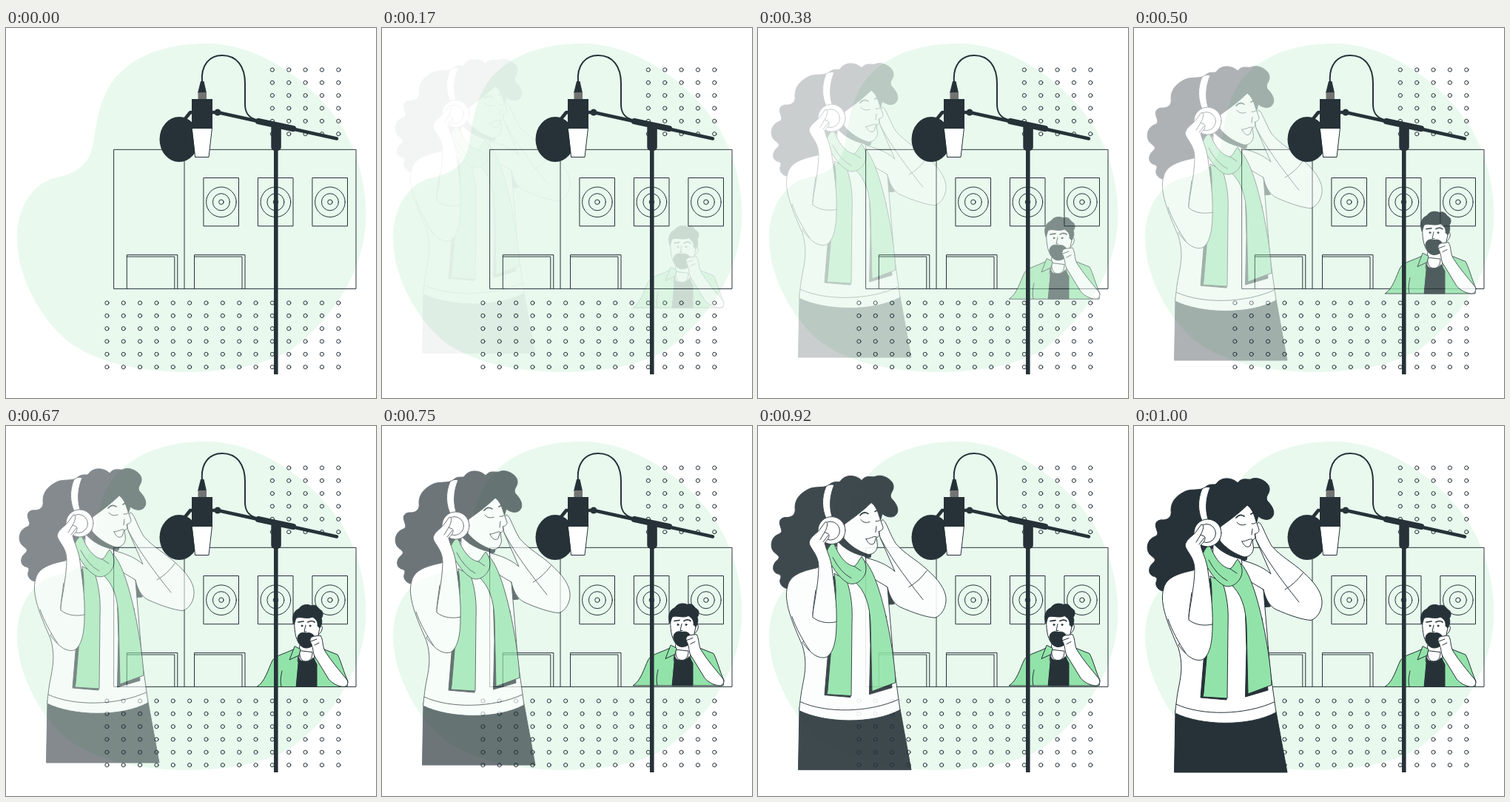
These frames come from a looping animation (500x500 px, 1040 ms). An HTML page:

```html
<!DOCTYPE html>
<html lang="en">
<head>
<meta charset="utf-8">
<title>Recording studio</title>
<style>
  html, body { margin: 0; width: 100%; height: 100%; overflow: hidden; background: #fff; }
  svg { display: block; width: 100vw; height: 100vh; }
  .line { fill: none; stroke: #263238; stroke-width: 1; stroke-linecap: round; stroke-linejoin: round; }
  .white { fill: #fff; }
  .green { fill: #92e3a9; }
  .dark { fill: #263238; }
  .rod { fill: none; stroke: #263238; stroke-linecap: round; stroke-linejoin: round; }
</style>
</head>
<body>
<svg viewBox="0 0 500 500">
  <path fill="#e9f9ee" d="M270 21C345 21 415 75 452 130C480 175 488 225 486 262C483 330 440 395 385 435C340 460 290 465 240 465C180 464 120 452 82 422C45 390 15 335 15 283C15 240 38 210 65 203C90 197 112 190 118 155C124 115 130 80 160 55C190 30 230 21 270 21Z"/>
  <g id="dots" class="line"></g>
  <g id="room" class="line">
    <path d="M146 164.3H473V352.4H146ZM241 164.3V352.4"/>
  </g>

  <g id="man" class="line">
    <path class="green" d="M388 302C376 308 364 310 360 317C354 329 350 346 339 352.4H461L462 345C456 332 453 318 448 309L428 301L410 310Z"/>
    <path class="white" d="M397 296L394 318L405 328L417 318L416 294Z"/>
    <path class="dark" d="M396 314C398 320 411 320 415 313L420 322V352.4H392.5Z"/>
    <path class="white" d="M397 304C396 310 398 318 405 318C412 318 414 312 414 306Z"/>
    <path class="green" d="M390 298L383 316L396 310L398 302Z"/>
    <path d="M372 352C370 344 372 336 373 331M396 310L392.5 352"/>
    <path class="white" d="M423 270C429 266 429 278 422 282Z"/>
    <path class="white" d="M390 260C389 274 391 287 396 294C404 302 416 297 421 287L425 268C424 258 416 252 408 252Z"/>
    <path class="dark" d="M389 268C386 259 388 250 396 247C400 240 409 241 413 243C419 240 422 246 424 248C429 250 429 256 426 260C428 265 426 270 424 273L421 270C422 264 418 260 414 258C406 262 396 256 392 260Z"/>
    <path class="dark" d="M394 287C394 280 400 278 406 280C412 278 418 283 418 289C417 297 411 300 405 300C398 299 395 294 394 287Z"/>
    <path class="white" d="M411 291C410 286 414 284 418 284L425 283C429 290 427 296 431 304C439 317 451 331 460 342C464 347 461 352.4 456 352.4C448 352 440 347 436 342L417 311C414 305 416 300 411 291Z"/>
    <path d="M412 291L420 288M417 296L423 293"/>
    <path stroke-width="1.7" d="M395 265L402 264M408 265Q413 262 417 265"/>
    <path d="M405 269L403 278L406 278"/>
    <circle class="dark" cx="400" cy="270" r="1"/>
    <circle class="dark" cx="411" cy="270" r="1"/>
  </g>

  <g id="woman" class="line">
    <path class="dark" d="M95 84C103 75 110 82 112 77C120 67 135 71 140 77C146 69 153 73 158 72C167 67 184 76 183 86C183 92 177 95 180 101C185 106 191 114 188 121C184 129 174 127 168 122L150 182C128 184 112 175 106 165L80 198L44 222C36 226 28 217 30 211C32 206 31 204 26 203C17 199 21 188 26 185C32 179 25 178 21 173C15 165 19 153 27 150C35 147 31 143 30 138C27 130 33 126 40 127C49 126 51 120 50 114C50 102 57 95 66 90C75 84 85 88 95 84Z"/>
    <path class="dark" d="M175 221L171 245L184 244Z"/>
    <path class="dark" d="M56 384L54.5 468H207L192 386Z"/>
    <path class="white" d="M80 195C56 200 43 206 40 220C34 240 46 268 60 300C66 320 64 335 61 350C58 364 57 375 55.5 388C90 405 155 407 192 387L184 330L175 222L148 182L105 176Z"/>
    <path d="M57 376C92 392 150 391 189.500 373"/>
    <path class="white" d="M140 180C158 184 174 190 185 200L165 154C163 146 163 135 168 130C173 131 176 145 186 162C199 177 214 184 228 197C244 211 253 224 254 236C255 248 248 260 239 262.500C228 262 210 256 192 248C182 243 177 231 175 221L148 205Z"/>
    <path d="M165 154C177 177 194 202 223 238M204 221Q218 213 228 199"/>
    <path class="white" d="M107 160L106 190L126 210L146 186L144 174Z"/>
    <path class="dark" d="M106 157C114 168 130 178 152 181L153 176L122 154Z"/>
    <path class="white" d="M153 107C159 111 162 119 164 126L169 140C169 144 166 145 163 146L164 151L160 155L161 161C163 169 158 177 149 177C136 173 124 165 116 155L117 136C128 128 141 119 153 107Z"/>
    <path d="M139 130Q143 136 151 133M159 132Q164 133 166 129M160 139L159 147"/>
    <path stroke-width="1.7" d="M138 124Q143 118 149 122M158 119L162 117"/>
    <path class="white" d="M146 156C151 156 156 152 160 153L157 162C153 165 149 163 146 156Z"/>
    <path class="white" d="M92 85C85 101 87 117 92 128L100 126C96 112 97 97 103 83Q97 81 92 85Z"/>

    <path class="dark" d="M102 207L94 318L90 367L125 370L120 210Z"/>
    <path class="green" d="M103 203C108 230 103 260 100 290L94 361L93 366L126 368L127 270C128 247 126 232 120 212Z"/>
    <path class="dark" d="M150 235L152 300L150.500 366L181 357L173 260Z"/>
    <path class="green" d="M130 213C145 226 151 245 152 270L154 362L186 350C184 310 174 260 165 230C159 210 153 196 145 186Z"/>
    <path class="green" d="M100 162C94 168 91 174 94 181C99 192 108 207 119 214C127 220 138 216 144 205C148 197 146 187 140 180C136 184 135 190 130 193C118 191 109 178 103 163Z"/>
    <path d="M130 193L139 199M101 181Q111 201 126 209"/>

    <circle class="white" cx="99.500" cy="144.500" r="18.500"/>
    <circle cx="98" cy="145" r="12.500"/>
    <path class="white" d="M69 162C69 154 79 149 83 144L91 133C96 133 93 142 90 147L95 149C98 152 94 158 90 161C92 171 98 180 100 196C103 220 107 244 106 270C106 293 102 311 92 316C78 319 68 306 60 296L70 283C73 255 82 219 82 194C82 178 72 171 69 162Z"/>
    <path class="white" stroke="none" d="M48 240L73 250L76 296L65 300L55 278Z"/>
    <path d="M78 225C76 240 74 252 74 262C84 270 97 270 106 268M46 261C51 276 61 294 70 307M90 147L84 157M95 151L88 160"/>
  </g>

  <g id="mic">
    <path class="rod" stroke-width="2" d="M265 73C263 50 275 37 292 37C312 37 323 52 323 75V103C323 115 328 121 338 124"/>
    <path class="rod" stroke-width="4.500" d="M241 124L249 114H286L447 149.500"/>
    <path class="rod" stroke-width="8" d="M341 126L388 136"/>
    <circle class="dark" cx="286" cy="114" r="4.500"/>
    <ellipse class="dark" cx="234" cy="150.500" rx="26.500" ry="30.500"/>
    <path class="dark" d="M263 72H267.500L271 88H259Z"/>
    <path fill="#737373" d="M259.500 87H271V97H259.500Z"/>
    <path class="line white" style="fill:#fff" d="M251.500 135H278.500L274 174.500H256Z"/>
    <path class="dark" d="M251 96H279V136H251Z"/>
    <rect class="dark" x="358.300" y="130" width="13.500" height="36" rx="5"/>
    <path class="dark" d="M362 150H367.600V468H362Z"/>
  </g>
</svg>
<script>
const byId = id => document.getElementById(id);
const man = byId('man'), woman = byId('woman');

function add(parent, tag, attrs) {
  const node = document.createElementNS('http://www.w3.org/2000/svg', tag);
  for (const name in attrs) node.setAttribute(name, attrs[name]);
  parent.appendChild(node);
}

function dotGrid(x, y, cols, rows) {
  for (let c = 0; c < cols; c++)
    for (let r = 0; r < rows; r++)
      add(byId('dots'), 'circle', { cx: x + c * 22.35, cy: y + r * 17.33, r: 2.6 });
}
dotGrid(359.9, 56.5, 5, 6);
dotGrid(136.4, 371.5, 15, 6);

const room = byId('room');
for (const x of [267.3, 340.8, 414.3]) {
  add(room, 'rect', { x, y: 202.5, width: 47.2, height: 65.2 });
  for (const r of [20.3, 11.5, 3.2]) add(room, 'circle', { cx: x + 23.6, cy: 235.2, r });
}
for (const x of [163.3, 254.5])
  add(room, 'path', { d: `M${x} 352.4V306.600h68.500V352.400M${x} 309h64.500V352.400` });

// Cubic Bézier easing, solved for x by bisection.
function bezier(x1, y1, x2, y2, x) {
  const at = (a, b, s) => 3 * (1 - s) ** 2 * s * a + 3 * (1 - s) * s * s * b + s ** 3;
  let lo = 0, hi = 1;
  for (let i = 0; i < 30; i++) {
    const mid = (lo + hi) / 2;
    if (at(x1, x2, mid) < x) lo = mid; else hi = mid;
  }
  return at(y1, y2, lo);
}

function slide(node, progress, distance) {
  node.setAttribute('opacity', Math.max(0, Math.min(1, progress)));
  node.setAttribute('transform', `translate(0 ${distance * (1 - progress)})`);
}

const LOOP = 1040, FPS = 24, LAST = 24, HIDDEN = 2;

function render(ms) {
  const centis = Math.floor((ms % LOOP) / 10);
  const step = Math.min(LAST, Math.floor((centis + 0.49) * FPS / 100));
  const visible = step > HIDDEN;
  slide(woman, visible ? ((step - HIDDEN) / (LAST - HIDDEN)) ** 1.26 : 0, -30);
  slide(man, visible ? bezier(0.36, -0.01, 0.5, 1.38, (step + 1) / (LAST + 1)) : 0, 30);
}

const start = performance.now();
function tick() {
  render(performance.now() - start);
  requestAnimationFrame(tick);
}
tick();
</script>
</body>
</html>
```
